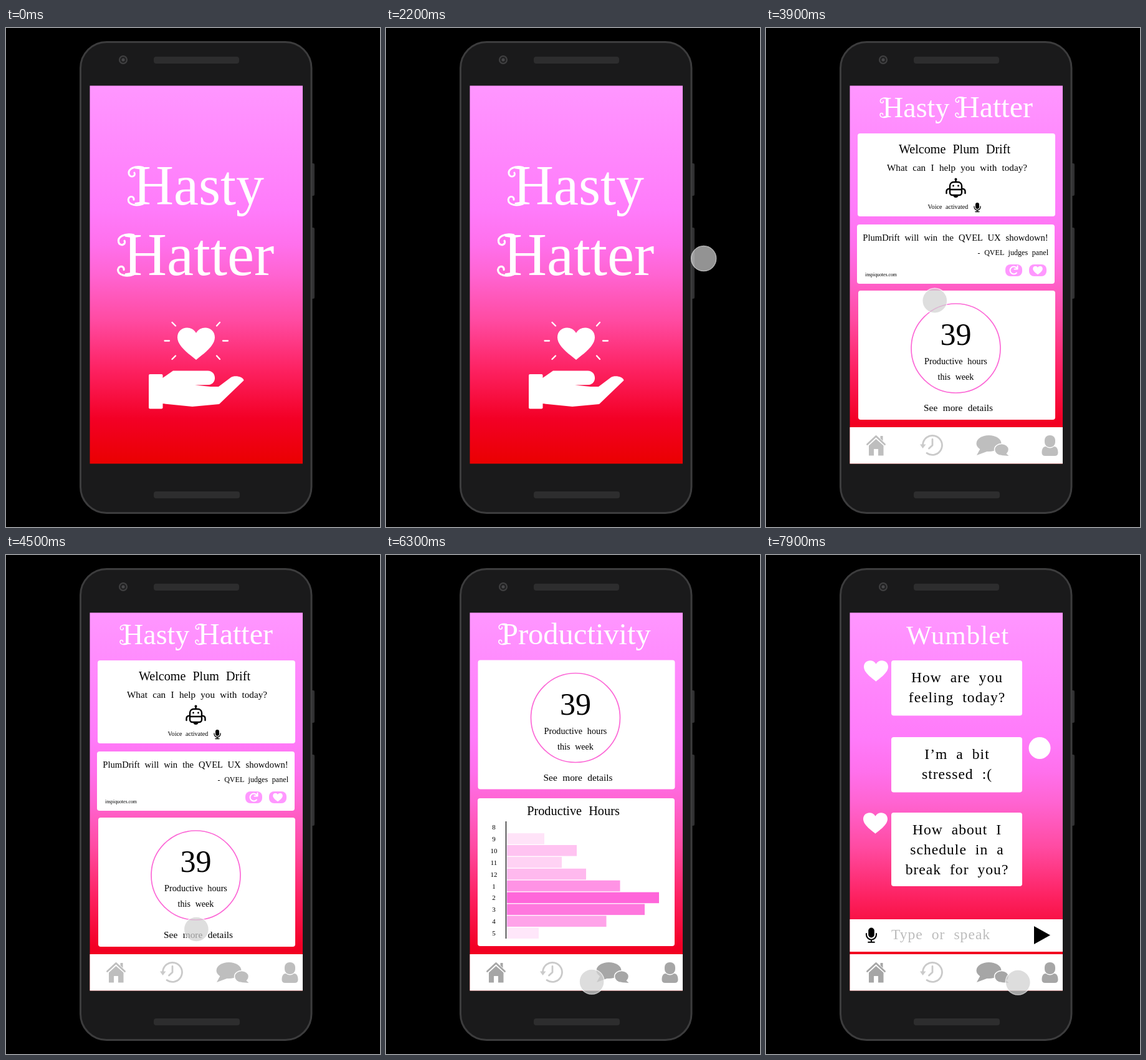
These frames come from a looping animation (600x800 px, 8 s). An HTML page:

```html
<!DOCTYPE html>
<html lang="en">
<head>
<meta charset="utf-8">
<style>
html, body { margin: 0; height: 100%; overflow: hidden; background: #000; }
svg { display: block; width: 600px; height: 800px; }
text { font-family: "Liberation Serif", serif; word-spacing: .3em; }
.chat text { letter-spacing: 1px; }
.title { fill: #fff; }
.line { fill: none; stroke-linecap: round; stroke-linejoin: round; }
</style>
</head>
<body>
<svg viewBox="0 0 600 800">
  <defs>
    <linearGradient id="sky" x2="0" y2="1">
      <stop stop-color="#ff96ff"/><stop offset=".33" stop-color="#ff7bfa"/>
      <stop offset=".42" stop-color="#ff70ec"/>
      <stop offset=".5" stop-color="#ff64d2"/><stop offset=".62" stop-color="#ff4ba2"/>
      <stop offset=".75" stop-color="#fd2262"/><stop offset=".88" stop-color="#f30026"/>
      <stop offset="1" stop-color="#ea0000"/>
    </linearGradient>
    <path id="heart" d="M0 51C-8 44-30 30-30 15C-30-2-8-6 0 8C8-6 30-2 30 15C30 30 8 44 0 51z"/>
    <g id="mic">
      <rect x="-3" y="-7.5" width="6" height="10" rx="3"/>
      <path class="line" d="M-5-1.5v1a5 5 0 0 0 10 0v-1M0 4.5V7M-3 7H3" stroke="#000" stroke-width="1.3"/>
    </g>
    <g id="curls" class="line" stroke="#fff" stroke-width="3">
      <path d="M16-61C2-64-9-58-7-50C-5-43 5-46 2-52"/>
      <path d="M16-1C6 3-8 1-8-8C-7-15 2-14 1-8"/>
    </g>
    <g id="hours"></g>
  </defs>

  <!-- phone -->
  <g fill="#303031">
    <rect x="488" y="217" width="7" height="52" rx="2"/>
    <rect x="488" y="320" width="7" height="114" rx="2"/>
  </g>
  <rect x="119.500" y="22.500" width="370.500" height="755" rx="42" fill="#1a1a1b" stroke="#3c3c3d" stroke-width="3"/>
  <circle cx="188" cy="51" r="6" fill="#222223" stroke="#414142" stroke-width="2"/>
  <circle cx="188" cy="51" r="2.500" fill="#48484a"/>
  <g fill="#2d2d2e">
    <rect x="237" y="46" width="137" height="11" rx="4"/>
    <rect x="237" y="743" width="138" height="11" rx="4"/>
  </g>
  <rect x="134.500" y="92.500" width="341.500" height="606" fill="url(#sky)"/>

  <g id="splash">
    <use href="#heart" x="305" y="481" fill="#fff"/>
    <path class="line" stroke="#fff" stroke-width="2.300" d="M254.500 501.500H262M348 501.500H356M266.500 472L272 477.500M343 472L338 477.500M272 525.500L266.500 531M338 525.500L343 531"/>
    <g fill="#fff">
      <rect x="229" y="555" width="22.500" height="55.500" rx="2"/>
      <path d="M250 562L268 549.500H323C338 549 339 570 326 572L303 572.500L328 575H341L361 560C367 556 381 559 381.500 565L342 603L299 607L250 602z"/>
    </g>
  </g>
  <g id="home"></g>
  <g id="stats"></g>
  <g id="chat" class="chat"></g>

  <g id="nav">
    <rect x="134.500" y="640" width="341.500" height="58.500" fill="#fff"/>
    <g id="icons">
      <path class="line" stroke="currentColor" stroke-width="2.800" d="M162.500 667.500L176.500 654.500L190.500 667.500"/>
      <path d="M183.500 654h4v8l-4-4zM165 669.500L176.500 659L188.500 669.500V685.500H180V675H173V685.500H165z"/>
      <ellipse cx="357.500" cy="666" rx="20" ry="13"/>
      <path d="M344 674L338 685L357 678z"/>
      <ellipse cx="378" cy="676" rx="11.500" ry="9.500" stroke="#fff" stroke-width="1.500"/>
      <path d="M384 681L389.500 686L377 685z"/>
      <rect x="447" y="653" width="17" height="19" rx="8"/>
      <path d="M442.500 681C442.500 674 445 671 449 671Q455.500 676 462 671C466 671 468.500 674 468.500 681Q468.500 686 463 686H448Q442.500 686 442.500 681z"/>
    </g>
    <g class="line" stroke="#cacaca" stroke-width="2.800">
      <path d="M251.500 668A15.500 15.500 0 1 1 258 681.500"/>
      <path d="M267 659.500V669L261.500 674"/>
    </g>
    <path d="M247 667.500H256.500L251.500 674z" fill="#cacaca"/>
  </g>

  <circle id="touch" r="20" fill="#d2d2d2" stroke="#fff" stroke-width="1.400"/>
</svg>
<script>
const $ = id => document.getElementById(id);
const add = (id, ...parts) => $(id).insertAdjacentHTML('beforeend', parts.join(''));

const text = (x, y, size, str, anchor = 'middle', fill = '#000') =>
  `<text x="${x}" y="${y}" font-size="${size}" text-anchor="${anchor}" fill="${fill}">${str}</text>`;
const rect = (x, y, right, bottom, fill = '#fff', r = 4) =>
  `<rect x="${x}" y="${y}" width="${right - x}" height="${bottom - y}" rx="${r}" fill="${fill}"/>`;
const title = (x, y, size, str) =>
  `<text class="title" x="${x}" y="${y}" font-size="${size}">${str}</text>` +
  (/^[HP]/.test(str) ? `<use href="#curls" transform="translate(${x} ${y}) scale(${size / 92})"/>` : '');
const heart = (x, y, s) =>
  `<use href="#heart" transform="translate(${x} ${y}) scale(${s})" fill="#fff"/>`;
const mic = (x, y, s) => `<use href="#mic" transform="translate(${x} ${y}) scale(${s})"/>`;

add('splash', title(204, 283, 90, 'Hasty'), title(188, 396, 97, 'Hatter'));

add('hours',
  rect(148, 421, 464, 628),
  '<circle cx="304.5" cy="513.5" r="71.5" fill="none" stroke="#fc68d6" stroke-width="1.7"/>',
  text(304.5, 508, 50, '39'),
  text(304.5, 539, 14.2, 'Productive hours'),
  text(304.5, 564, 14.1, 'this week'),
  text(308.5, 614, 15.4, 'See more details'));

add('home',
  title(187, 143, 46, 'Hasty'), title(308, 143, 48, 'Hatter'),
  rect(147, 169, 464, 302),
  text(302.5, 201, 20.1, 'Welcome Plum Drift'),
  text(306.5, 229, 15.15, 'What can I help you with today?'),
  `<g class="line" stroke="#000" stroke-width="2.4">
    <path d="M295 258V253a6 6 0 0 1 6-6h7a6 6 0 0 1 6 6V264a4 4 0 0 1-4 4h-11a4 4 0 0 1-4-4zM295 259h19M304.500 247v-4"/>
    <path d="M289.500 265v-3a4 4 0 0 1 5-4M319.500 265v-3a4 4 0 0 0-5-4"/>
  </g>
  <circle cx="304.500" cy="242.500" r="2"/><circle cx="300.500" cy="253" r="1.400"/><circle cx="308.500" cy="253" r="1.400"/>
  <path d="M300.500 268h8a4 4 0 0 1-8 0z"/>`,
  text(292, 290, 10.1, 'Voice activated'),
  mic(339, 287.5, 1),
  rect(146, 315, 463, 410),
  text(304, 341, 14.6, 'PlumDrift will win the QVEL UX showdown!'),
  text(453, 364, 12.1, '- QVEL judges panel', 'end'),
  text(159, 398, 7.8, 'inspiquotes.com', 'start'),
  rect(384, 379, 411, 398, '#ff98ff', 8),
  rect(422, 379, 450, 398, '#ff98ff', 8),
  `<path class="line" stroke="#fff" stroke-width="2" d="M402 392.500A6 6 0 1 1 402 384.500M403.500 381.500V386.500H398.500"/>`,
  heart(436, 382, .26),
  '<use href="#hours"/>');

// Hourly chart: longer bars are stronger pink
const ends = [194, 254, 306, 282, 321, 375.5, 438, 415, 353.5, 245];
add('stats',
  title(185, 143, 48.5, 'Productivity'),
  '<use href="#hours" x="-.5" y="-252.5"/>',
  rect(147, 390, 463, 627),
  text(300.5, 417, 20.3, 'Productive Hours'),
  ...ends.map((end, i) => {
    const y = 436 + 18.9 * i, alpha = ((end - 194) / 244) ** 1.2;
    return text(173, y + 4, 11, (i + 7) % 12 + 1) +
      rect(194, y - 8.8, end, y + 8.8, `rgba(255,102,218,${alpha})`, 0);
  }),
  '<path d="M192.500 427V615" stroke="#000" stroke-width="1.200"/>');

const bubble = (top, bottom, ...lines) => rect(201, top, 411, bottom) +
  lines.map((s, i) => text(306.5, top + 34.5 + 32.3 * i, 23.6, s)).join('');
add('chat',
  title(225, 143, 43, 'Wumblet'),
  heart(176.5, 169.5, .65), bubble(169, 257.5, 'How are you', 'feeling today?'),
  '<circle cx="439" cy="309.5" r="17.5" fill="#fff"/>',
  bubble(292, 380.5, 'I’m a bit', 'stressed :('),
  heart(175.5, 413.5, .65),
  bubble(413, 531, 'How about I', 'schedule in a', 'break for you?'),
  rect(134.5, 584, 476, 636, '#fff', 0),
  mic(169, 609.5, 1.6),
  text(201, 616, 23.6, 'Type or speak', 'start', '#bcbcbc'),
  '<path d="M430 595V624L456 609.500z"/>');

const scenes = [['splash', 0], ['home', 3000], ['stats', 5700], ['chat', 7000]];

// Touch gestures: a sweep round the phone, a loop round the ring, taps in the bar.
// Each point is time, x, y, opacity.
const gestures = [
  [[1250, 106, 345, 0], [1350, 106, 360, .7], [1500, 150, 500, .7], [1650, 270, 620, .7],
   [1800, 430, 650, .7], [1900, 500, 600, .7], [2000, 528, 530, .7], [2100, 529, 440, .7],
   [2200, 510, 370, .7], [2350, 440, 295, .7], [2500, 340, 260, .7], [2700, 230, 280, 0]],
  [[3600, 350, 442, 0], [3750, 310, 430, .72], [3900, 271, 437, .72], [4100, 221, 505, .72],
   [4300, 232, 575, .72], [4500, 305, 600, .72], [4700, 375, 562, .72], [4900, 388, 495, 0]],
  [[5300, 280, 708, .1], [5400, 276, 700, .45], [5600, 268, 674, .75], [5900, 270, 676, .75],
   [6300, 330, 684, .75], [6700, 358, 669, .75], [7200, 361, 670, .75], [7900, 404, 685, .75],
   [8000, 413, 684, .75]]
];

function touchAt(t) {
  const points = gestures.find(g => t >= g[0][0] && t < g[g.length - 1][0]);
  if (!points) return [0, 0, 0];
  const i = points.findIndex(p => p[0] > t), b = points[i - 1], c = points[i];
  const a = points[i - 2] || b, d = points[i + 1] || c;
  const u = (t - b[0]) / (c[0] - b[0]);
  const spline = n => b[n] + u / 2 * (c[n] - a[n] +
    u * (2 * a[n] - 5 * b[n] + 4 * c[n] - d[n] + u * (3 * (b[n] - c[n]) + d[n] - a[n])));
  return [spline(1), spline(2), b[3] + (c[3] - b[3]) * u];
}

function draw(now) {
  const t = now % 8000;
  const current = scenes.filter(s => s[1] <= t).pop()[0];
  for (const [id] of scenes) $(id).style.display = id === current ? '' : 'none';
  $('nav').style.display = current === 'splash' ? 'none' : '';
  const grey = current === 'home' ? '#bebebe' : '#a6a6a6';
  $('icons').setAttribute('fill', grey);
  $('icons').style.color = grey;
  const [x, y, alpha] = touchAt(t);
  $('touch').setAttribute('transform', `translate(${x} ${y})`);
  $('touch').setAttribute('opacity', alpha);
}

const start = performance.now();
function tick() {
  draw(performance.now() - start);
  requestAnimationFrame(tick);
}
tick();
</script>
</body>
</html>
```
